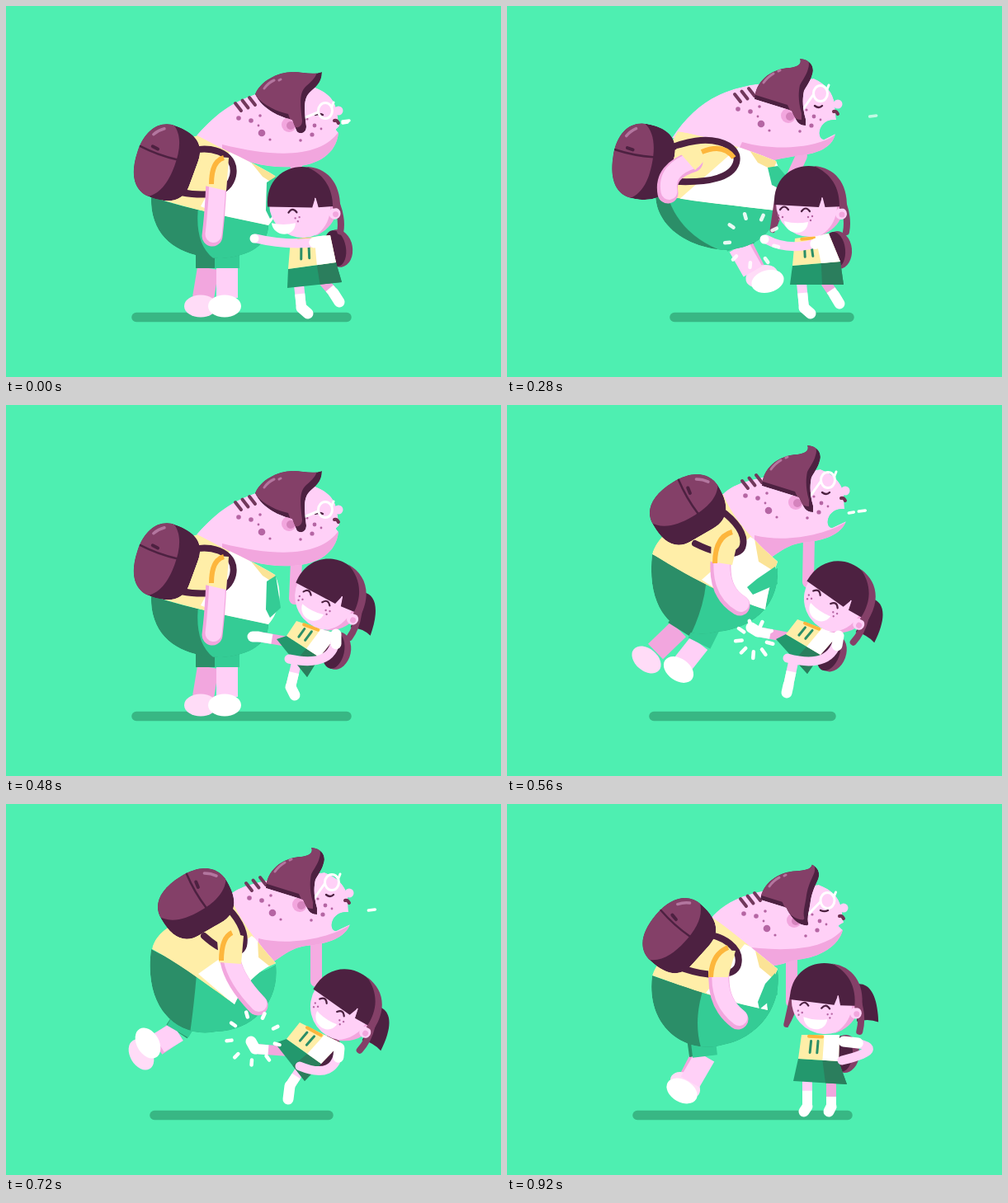
Recreate the animation shown at these times as an HTML page. Size 600 by 450 pixels, loop 0.96 s.

```html
<!DOCTYPE html>
<html lang="en">
<head>
<meta charset="utf-8">
<title>Playground kick</title>
<style>
html, body { margin: 0; width: 100%; height: 100%; overflow: hidden; background: #4eefb1; }
svg { display: block; width: 100%; height: 100%; }
</style>
</head>
<body>
<svg id="stage" viewBox="0 0 600 450"></svg>
<script>
const LOOP = 960, STEP = 40;
const SKIN = '#ffd0f7', ROSE = '#f2a6de', DARK = '#4d2141', PLUM = '#844068', SHINE = '#b3769f',
  GREEN = '#2b8e68', LIGHT = '#34cc95', YELLOW = '#ffeea8', ORANGE = '#fdb63c', SPOT = '#b565a3';

// Pose times and easing of the way to the next pose
const TIMES = [0, 120, 280, 480, 560, 720, 920, LOOP];
const lin = k => k, out = k => 1 - (1 - k) ** 2, soft = k => k * k * (3 - 2 * k);
const EASE = [out, lin, soft, out, lin, soft, lin];
const BOY = [0, 1, 2, 0, 3, 4, 5, 0], GIRL = [0, 1, 2, 3, 4, 5, 6, 0];
const NUM = /-?\d+(\.\d+)?/g;

const blend = (a, b, k) => {
  const n = b.match(NUM);
  let i = 0;
  return a.replace(NUM, v => +(+v + (n[i++] - v) * k).toFixed(2));
};
const move = (s, dx, dy) => {
  let i = 0;
  return s.replace(NUM, v => +v + (i++ % 2 ? dy : dx));
};

// Boy: standing, hit, floating, kicked, thrown, landing
const six = p => [p[0], p[1], move(p[1], 0, 2), p[2], move(p[2], 6, 5), p[3]];
const face = six([
  'M231,157 C250,135 270,118 302,107 L372,98 C392,105 399,115 401,128 L404,146 C402,148 400,149 400,150 L403,154 C400,180 378,193 348,195 C318,197 290,190 262,176 Z',
  'M200,158 C225,120 255,100 301,93 L372,86 C388,93 395,104 397,116 L399,136 C378,134 374,158 384,160 L398,153 C394,172 372,178 350,180 C330,183 310,190 285,185 Z',
  'M258,112 C270,98 285,93 309,88 L380,78 C398,85 405,95 408,106 L409,126 C388,124 384,148 394,149 L411,141 C405,157 385,165 358,167 C335,170 325,185 310,190 Z',
  'M246,140 C260,122 280,112 308,106 L378,98 C394,104 402,113 405,125 L408,144 C404,146 402,147 402,148 L407,153 C402,172 380,186 352,189 C335,192 328,200 300,195 Z'
]);
const jaw = six([
  'M405,150 C385,182 335,186 262,168 L262,205 L405,205 Z',
  'M400,152 C385,168 330,176 285,163 L270,195 L400,195 Z',
  'M412,141 C390,156 340,168 300,158 L300,195 L412,195 Z',
  'M407,152 C385,178 335,180 280,172 L280,210 L407,210 Z'
]);
const shirt = [
  'M205,165 L232,157 C265,175 300,190 326,206 C336,228 332,250 318,266 C270,256 220,246 176,231 C178,205 190,180 205,165 Z',
  'M185,185 L207,150 C245,158 290,172 326,186 C334,205 332,228 325,247 C280,240 225,235 178,222 C178,208 180,195 185,185 Z',
  'M188,185 L207,152 C245,158 290,173 326,188 C334,206 332,228 325,248 C280,242 225,238 180,228 C180,210 182,195 188,185 Z',
  'M215,140 L262,108 C275,140 300,165 328,190 C322,205 316,228 313,248 C270,235 220,208 176,181 C180,165 195,150 215,140 Z',
  'M215,140 L270,108 C282,140 305,168 327,193 C310,200 290,215 277,243 C255,228 220,200 177,176 C180,160 195,148 215,140 Z',
  'M205,175 L248,137 C275,155 300,178 328,200 C322,215 312,230 316,250 C280,243 230,228 176,208 C180,195 190,183 205,175 Z'
];
const white = [
  'M274,172 L236,243 L340,285 L345,205 Z', 'M284,166 L203,230 L335,260 L340,185 Z',
  'M284,168 L207,236 L335,262 L340,188 Z', 'M295,160 L236,212 L310,260 L345,190 Z',
  'M298,160 L233,206 L290,255 L340,190 Z', 'M288,170 L241,229 L325,262 L345,195 Z'
];
const collar = [
  'M290,181 L328,202 L325,216 L311,207 Z', 'M292,170 L328,185 L322,197 L304,188 Z',
  'M292,172 L328,187 L322,199 L304,190 Z', 'M300,162 L329,188 L326,203 L305,190 Z',
  'M305,164 L328,190 L326,202 L306,186 Z', 'M300,174 L329,199 L323,212 L306,198 Z'
];
const tie = [
  'M316,214 L327,207 L333,246 L320,258 L315,248 Z', 'M316,195 L328,193 L346,211 L341,226 L322,215 Z',
  'M316,196 L328,194 L345,214 L342,228 L321,217 Z', 'M303,211 L325,196 L328,217 L298,230 L291,221 Z',
  'M306,212 L325,197 L325,222 L302,236 L292,228 Z', 'M313,218 L325,205 L328,231 L306,249 L304,240 Z'
];
const trunk = [
  'M176,231 C220,246 270,256 318,264 C319,288 298,303 262,306 C215,306 174,285 176,231 Z',
  'M178,222 C225,235 280,240 325,247 C325,275 300,292 262,293 C215,290 180,265 178,222 Z',
  'M180,228 C225,237 280,243 325,248 C325,275 300,295 262,296 C215,292 180,265 180,228 Z',
  'M176,181 C230,205 290,225 328,198 C330,250 290,272 255,275 C205,288 168,250 176,181 Z',
  'M176,176 C230,205 290,220 327,195 C332,240 300,275 255,276 C210,285 166,250 176,176 Z',
  'M176,208 C230,228 290,240 328,202 C334,250 300,285 262,292 C215,305 168,270 176,208 Z'
];
// lit front half of the shorts
const lap = [
  'M234,235 Q226,290 254,308 L360,320 L360,190 Z', 'M190,215 Q202,275 268,298 L360,310 L360,190 Z',
  'M192,220 Q204,278 268,300 L360,310 L360,190 Z', 'M242,205 Q241,245 217,290 L360,300 L360,190 Z',
  'M232,195 Q228,245 222,285 L360,300 L360,190 Z', 'M238,224 Q224,268 238,304 L360,310 L360,190 Z'
];
// hip, hem, ankle, shoe, shoe angle
const backLeg = [
  '245,275 245,318 239,354 236,364 0', '285,268 290,286 305,306 312,313 60', '280,268 285,291 300,320 309,328 -15',
  '225,245 208,272 180,299 169,309 40', '224,250 207,276 182,293 164,304 60', '230,262 236,305 222,332 216,341 35'
];
const frontLeg = [
  '268,275 268,318 268,354 265,364 0', '270,265 284,293 296,328 300,344 -12', '270,265 281,292 298,322 316,334 -15',
  '250,255 233,289 214,313 208,321 35', '222,252 208,276 185,290 172,290 60', '235,262 240,306 222,337 212,348 30'
];
const strap = [
  'M222,176 C255,168 280,182 275,206 C270,228 245,232 212,226', 'M190,175 C245,145 285,165 279,188 C275,208 240,216 188,212',
  'M192,175 C245,150 284,168 278,190 C272,210 240,216 190,212', 'M250,122 C268,132 290,152 286,170 C284,184 260,184 228,168',
  'M262,120 C280,135 292,155 288,172 C284,186 262,180 240,160', 'M235,158 C262,158 285,175 280,195 C276,210 245,210 215,200'
];
const sleeve = [
  'M246,182 L270,184 L267,224 L241,218 Z', 'M205,172 L236,168 L238,188 L228,198 Z', 'M205,173 L236,169 L238,189 L228,199 Z',
  'M248,152 L281,160 L273,194 L247,190 Z', 'M255,152 L288,160 L285,194 L258,192 Z', 'M244,176 L277,178 L268,210 L244,210 Z'
];
const seam = [
  'M249,216 Q249,188 264,184', 'M236,176 Q262,164 277,182', 'M236,177 Q262,166 275,184',
  'M252,192 Q252,160 273,154', 'M261,190 Q261,162 274,156', 'M247,210 Q248,182 268,174'
];
const arm = [
  'M255,212 Q254,245 250,279', 'M226,186 Q200,195 203,230', 'M225,189 Q190,200 195,227',
  'M259,192 Q257,228 282,243', 'M272,190 Q277,215 305,244', 'M257,207 Q255,242 280,261'
];
const farArm = [
  'M352,190 L350,235', 'M352,178 L345,210', 'M357,182 L345,208', 'M366,160 L365,215', 'M376,165 L376,215', 'M345,185 L345,240'
];
const pack = ['194,190,20', '164,186,11', '165,189,11', '219,126,60', '230,120,60', '208,159,42'];
// ear x, ear y, quiff lift
const skull = ['343,144,0', '343,131,1', '341,133,1', '350,118,1', '356,122,1', '348,141,0.7'];
const bar = ['158,413', '206,415', '203,415', '178,393', '180,391', '158,413'];
const hair = [
  'M-41,-37 C-35,-52 -15,-64 5,-64 C18,-64 28,-60 40,-64 C40,-50 31,-45 25,-39 C18,-32 18,-20 21,2 C21,12 11,12 9,7 L4,-6 C-10,-9 -32,-18 -41,-37 Z',
  'M-41,-20 C-40,-41 -22,-57 2,-58 C10,-59 17,-62 14,-69 C28,-68 32,-58 29,-50 C27,-42 22,-36 19,-30 C17,-20 17,-10 21,4 C21,12 12,12 10,7 L4,-6 C-8,-8 -28,-12 -41,-20 Z'
];

// Girl: punch, follow-through, grin, kick ready, kick, recoil, proud
const gHead = ['360,238,-2,-14,0', '357,244,0,-16,0', '367,237,0,-6,1', '392,230,25,0,1', '402,233,32,0,1', '411,244,32,0,1', '386,236,4,0,1'];
const gTail = ['0,0', '0,0', '0,1', '1,0', '1,0', '1,0', '1,1'];
// shoulders, waist, skirt hem, clockwise from top left
const gBody = [
  '345,283 393,278 400,311 342,319 407,335 341,342', '343,287 385,278 398,310 341,319 403,336 339,343',
  '349,282 390,276 404,310 346,315 408,338 343,338', '352,262 402,278 380,306 340,280 365,330 328,284',
  '352,260 402,278 380,303 338,278 364,326 326,284', '356,265 406,290 382,315 340,285 362,336 326,290',
  '357,280 403,280 402,312 353,309 412,340 347,336'
];
const gStand = [
  '355,338 358,366 366,373', '353,340 358,367 366,373', '357,336 360,366 368,373', '352,313 345,342 350,352',
  '347,312 341,340 339,349', '357,322 344,342 342,358', '364,335 364,367 360,373'
];
const gKick = [
  '385,334 397,348 404,359', '382,334 396,349 406,355', '386,335 397,351 403,361', '347,288 306,281 299,281',
  '342,282 304,275 296,270', '342,300 302,297 297,288', '393,337 393,367 390,373'
];
const gArm = [
  'M385,285 Q345,292 303,282', 'M380,282 Q340,290 305,284', 'M385,284 Q345,300 314,283', 'M400,278 Q400,320 343,308',
  'M402,280 Q395,322 340,307', 'M404,296 Q400,336 356,318', 'M408,288 Q470,295 406,311'
];
const gPack = ['403,294,-10', '391,291,-14', '401,296,-6', '401,298,12', '394,301,20', '389,303,20', '410,303,4'];

const attr = o => Object.entries(o).map(([k, v]) => `${k}="${v}"`).join(' ');
const tag = (name, o) => `<${name} ${attr(o)}/>`;
const fill = (d, color, o = {}) => tag('path', { d, fill: color, ...o });
const line = (d, color, w, cap = 'round') =>
  tag('path', { d, fill: 'none', stroke: color, 'stroke-width': w, 'stroke-linecap': cap });
const dot = (cx, cy, r, color) => tag('circle', { cx, cy, r, fill: color });
const oval = (x, y, rx, ry, a, color) =>
  tag('ellipse', { rx, ry, fill: color, transform: `translate(${x} ${y}) rotate(${a})` });
const clip = (id, d, body) => `<clipPath id="${id}">${tag('path', { d })}</clipPath><g clip-path="url(#${id})">${body}</g>`;
const group = (x, y, a, body) => `<g transform="translate(${x} ${y}) rotate(${a})">${body}</g>`;

let seg, part;
const pose = list => {
  const order = list.length > 6 ? GIRL : BOY;
  return blend(list[order[seg]], list[order[seg + 1]], part);
};
const vals = list => pose(list).match(NUM).map(Number);

function boyLeg(list, skin, shoe, cloth) {
  const [hx, hy, mx, my, ax, ay, sx, sy, a] = vals(list);
  return line(`M${mx},${my} L${ax},${ay}`, skin, 26, 'butt') + oval(sx, sy, 20, 13.5, a, shoe) +
    line(`M${hx},${hy} L${mx},${my}`, cloth, 30, 'butt');
}

function boyPack() {
  const [x, y, a] = vals(pack);
  const shell = 'M-37,0 C-38,-30 -24,-46 -4,-46 C20,-46 36,-38 36,-14 L36,16 C36,38 20,46 -4,46 C-24,46 -36,30 -37,0 Z';
  const front = 'M-40,0 C-40,-32 -26,-50 -10,-48 C6,-40 11,-22 11,0 C11,22 6,40 -10,48 C-26,50 -40,32 -40,0 Z';
  return group(x, y, a, clip('pack', shell, fill(shell, DARK) + fill(front, PLUM)) +
    line('M-36,-8 Q-12,-5 11,-8', DARK, 2.5) + line('M-22,-13 L-15,-12', DARK, 4) +
    line('M-26,-27 Q-22,-34 -16,-38', SHINE, 3.5));
}

function boyHead() {
  const [x, y, s] = vals(skull);
  const d = blend(hair[0], hair[1], s), gx = 44 - 5 * s, gy = -17 - 10 * s;
  const spots = [[-33, 10, 4.3], [-46, -5, 2.8], [-61, -8, 2.8], [-35, -11, 1.8], [-37, 1, 1.4], [-23, 18, 1.6],
    [31, 1, 2.4], [28, 12, 2.6], [14, 19, 1.8], [22, -7, 1.6], [39, 5, 1.4]];
  let body = spots.map(p => dot(...p, SPOT)).join('');
  for (let i = 0; i < 3; i++) body += line(`M${-65 + i * 8.5},${-26 - i * 3.5} l7,9`, '#71385c', 4);
  body += dot(0, 0, 9, ROSE) + dot(2, 1, 5, '#d583bd') + dot(60, -17 + 3 * s, 5.5, SKIN);
  body += line(`M32,-12 Q37,${-14 + 6 * s} 41,-12`, DARK, 2.4);
  body += tag('ellipse', { cx: gx, cy: gy, rx: 8.5, ry: 9.5, fill: 'none', stroke: '#fff', 'stroke-width': 3 });
  body += line(`M${gx - 9},${gy + 2} L18,-8`, '#fff', 3) + line(`M${gx + 8},${gy - 5} l2,-5`, '#fff', 3);
  body += line('M55,-5 Q58,-6 60,-2', '#713052', 4);
  body += clip('hair', d, fill(d, DARK) + fill(d, PLUM, { transform: 'translate(-5 -7)' }));
  body += line(`M-30,${-44 + 4 * s} Q-25,${-51 + 4 * s} -18,${-54 + 3 * s}`, SHINE, 3) + line('M-12,-54 l2,-1', SHINE, 3);
  return group(x, y, 0, body);
}

function boyArm() {
  const d = pose(arm);
  return line(d, ROSE, 25) + line(move(d, 1.5, -2), SKIN, 20);
}

function boy() {
  const skin = pose(face), body = pose(trunk), top = pose(shirt);
  return line(pose(farArm), '#f5ace2', 14) +
    boyLeg(backLeg, ROSE, '#ffdcf7', GREEN) + boyLeg(frontLeg, SKIN, '#fff', LIGHT) +
    clip('trunk', body, fill(body, GREEN) + fill(pose(lap), LIGHT)) +
    clip('face', skin, fill(skin, SKIN) + fill(pose(jaw), ROSE)) +
    clip('shirt', top, fill(top, YELLOW) + fill(pose(white), '#fff') + fill(pose(collar), '#fbe396')) +
    fill(pose(tie), LIGHT) + line(pose(strap), DARK, 8) + boyPack() + boyArm() +
    fill(pose(sleeve), YELLOW) + line(pose(seam), ORANGE, 6, 'butt') + boyHead();
}

function girlLeg(list, skin, sock) {
  const [x, y, ax, ay, tx, ty] = vals(list);
  const mx = x + (ax - x) * sock, my = y + (ay - y) * sock;
  return line(`M${x},${y} L${ax},${ay}`, skin, 12, 'butt') +
    line(`M${mx},${my} L${ax},${ay}`, '#fff', 12, 'butt') + line(`M${ax},${ay} L${tx},${ty}`, '#fff', 13);
}

function girlBody() {
  const b = vals(gBody);
  const pt = i => [b[2 * i], b[2 * i + 1]];
  const mid = (p, q, k) => p.map((v, i) => +(v + (q[i] - v) * k).toFixed(2));
  const quad = (...p) => 'M' + p.join(' L') + ' Z';
  const [sl, sr, wr, wl, hr, hl] = [0, 1, 2, 3, 4, 5].map(pt);
  const at = (u, v) => mid(mid(sl, sr, u), mid(wl, wr, u), v);
  return fill(quad(wl, wr, hr, hl), '#23986d') +
    fill(quad(mid(wl, wr, .6), wr, hr, mid(hl, hr, .6)), '#2b7e5d') +
    fill(quad(sl, sr, wr, wl), YELLOW) + fill(quad(at(.6, 0), sr, wr, at(.6, 1)), '#fff') +
    [.27, .45].map(u => line(`M${at(u, .25)} L${at(u, .72)}`, GREEN, 3)).join('') +
    line(`M${at(.2, .06)} L${at(.55, .08)}`, ORANGE, 4);
}

function girlHead() {
  const [x, y, a, turn, left] = vals(gHead), [tail, lock] = vals(gTail);
  const eye = (cx, cy, o) => `<g opacity="${o}">${line(`M${cx - 5},${cy + 2} Q${cx},${cy - 5} ${cx + 5},${cy + 2}`, DARK, 2.2)}</g>`;
  const mouth = `M${turn - 25},24 Q${turn - 11},28 ${turn + 4},25 C${turn + 3},43 ${turn - 23},42 ${turn - 25},24 Z`;
  const freckles = [[-32, 17], [-27, 19], [-31, 22], [4, 19], [9, 18], [7, 23]];
  const cap = 'M-43,4 C-46,-57 41,-61 43,6 L18,7 L15,-5 L11,7 Z';
  return group(x, y, a,
    `<g opacity="${tail}">${fill('M36,-20 C52,-24 63,-8 66,24 Q54,20 40,25 Z', DARK)}</g>` +
    `<g opacity="${lock}">${fill('M-43,-2 L-32,8 Q-37,26 -43,38 Q-50,39 -48,32 Z', PLUM)}</g>` +
    dot(0, 2, 41, SKIN) + fill('M12,42 C34,34 42,18 41,0 L33,0 C34,20 26,34 12,42 Z', ROSE) +
    line('M41,4 Q47,22 44,37', PLUM, 8) + dot(38, 15, 7, SKIN) + dot(39, 16, 3.5, ROSE) +
    eye(-25 + turn, 8, left) + eye(1 + turn, 10, 1) +
    freckles.map(([fx, fy], i) => i > 2 || left > .5 ? dot(fx + turn, fy, 1.2, SPOT) : '').join('') +
    fill(mouth, '#fff') + fill(cap, DARK) +
    fill('M5,-43 C30,-41 46,-23 45,8 L36,9 C37,-18 25,-34 5,-43 Z', PLUM) +
    line('M15,-4 L18,8', SKIN, 1.5));
}

function girl() {
  const [px, py, pa] = vals(gPack), d = pose(gArm), n = d.match(NUM).map(Number);
  const cuff = [n[0] + (n[2] - n[0]) * .28, n[1] + (n[3] - n[1]) * .28];
  return oval(px, py, 17, 23, pa, PLUM) + oval(px - 4, py, 13, 22, pa, DARK) +
    girlLeg(gKick, ROSE, .6) + girlLeg(gStand, SKIN, .4) + girlBody() + girlHead() +
    line(d, SKIN, 11) + line(`M${n[0]},${n[1]} L${cuff}`, '#fff', 13) +
    (n[4] < 320 ? dot(n[4] - 2, n[5], 5.5, '#fff') : '');
}

function burst(x, y, age) {
  if (age < 0 || age > 1) return '';
  let s = '';
  const r = 12 + 16 * out(age), len = 8 * (1 - .35 * age);
  for (let i = 0; i < 9; i++) {
    const a = i * Math.PI * 2 / 9 + .25, c = Math.cos(a), n = Math.sin(a);
    s += line(`M${x + c * r},${y + n * r} l${c * len},${n * len}`, '#fff', 4.5);
  }
  return `<g opacity="${Math.min(1, 4 - 4 * age)}">${s}</g>`;
}

function spit(x, y, age) {
  if (age < 0 || age > 1) return '';
  const px = x + 20 * out(age), gap = age < .1 ? 0 : 12;
  const first = age < .55 ? line(`M${px},${y} l6,-1`, '#fff', 3.5) : '';
  return `<g opacity="${Math.min(1, 2.4 - 2 * age)}">${first}${line(`M${px + gap},${y - 2} l8,-1`, '#fff', 3.5)}</g>`;
}

const stage = document.getElementById('stage');
function draw(t) {
  seg = TIMES.findIndex((v, i) => t >= v && t < TIMES[i + 1]);
  part = EASE[seg]((t - TIMES[seg]) / (TIMES[seg + 1] - TIMES[seg]));
  const [l, r] = vals(bar);
  stage.innerHTML = tag('rect', { width: 600, height: 450, fill: '#4eefb1' }) +
    line(`M${l},377.5 L${r},377.5`, '#38b784', 11.5) + boy() + girl() +
    burst(297, 284, (t - 70) / 270) + burst(300, 284, (t - 530) / 270) +
    spit(408, 142 - Math.min(t, 120) / 20, t / 320) + spit(409, 131, (t - 520) / 280);
}

const start = performance.now();
let last = -1;
function tick() {
  const t = Math.floor((performance.now() - start) % LOOP / STEP) * STEP;
  if (t !== last) draw(last = t);
  requestAnimationFrame(tick);
}
tick();
</script>
</body>
</html>
```
